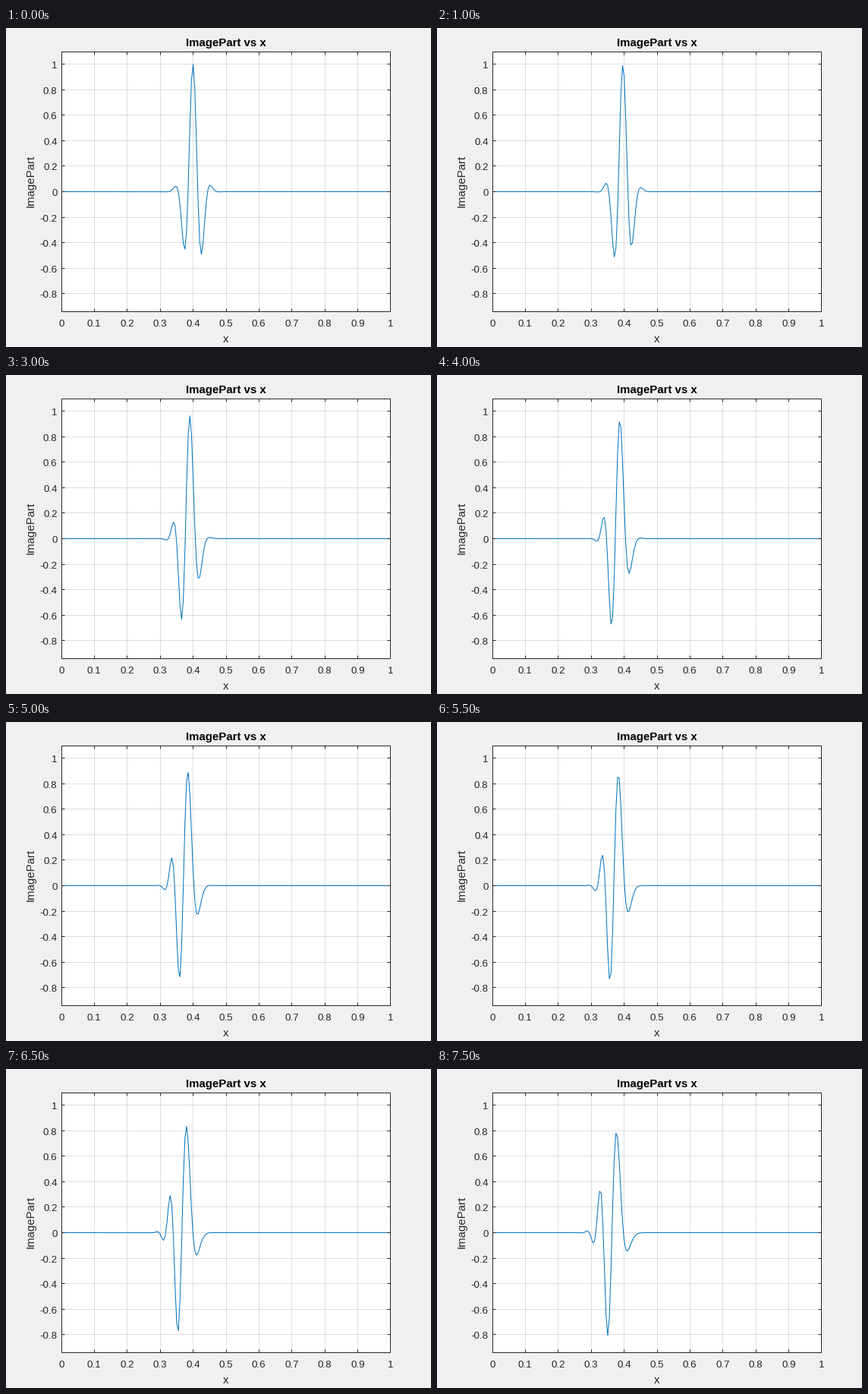
A matplotlib script that plays this animation: 560 by 420 pixels, repeating every 8 s.

```python
import numpy as np
import matplotlib.pyplot as plt
from matplotlib.animation import FuncAnimation

W, H, DPI = 560, 420, 100
LEFT, RIGHT, TOP, BOTTOM = 72.6, 506.4, 31, 373
ZERO, UNIT = 215, 168
INK, BLUE = "#262626", "#0072BD"
TICK_FONT, LABEL_FONT = 13.33, 15
TICK = 4
FRAMES, INTERVAL = 16, 500


def pt(px):
    return px * 72 / DPI


def px_x(x):
    return LEFT + x * (RIGHT - LEFT)


def px_y(y):
    return ZERO - y * UNIT


# Gaussian packet on a lattice, drifting left and spreading
DX, X0, K, A, PHASE, DT = 0.005, 0.4, 106.0, 1000.0, 0.079, 2.43e-5
ENERGY = (1 - np.cos(K * DX)) / DX**2
SPEED = np.sin(K * DX) / DX
SPREAD = 2 * A * np.cos(K * DX)
x = np.linspace(0, 1, 201)


def packet(t):
    w = X0 - x
    z = w - SPEED * t
    s = 1 + 1j * SPREAD * t
    carrier = np.exp(1j * (K * w - ENERGY * t - PHASE))
    return (carrier * np.exp(-A * z**2 / s) / np.sqrt(s)).real


fig = plt.figure(figsize=(W / DPI, H / DPI), dpi=DPI, facecolor="#f0f0f0")
ax = fig.add_axes([0, 0, 1, 1])
ax.set_xlim(0, W)
ax.set_ylim(H, 0)
ax.axis("off")


def stroke(xs, ys, color=INK, z=5, cap="butt", **kw):
    return ax.plot(xs, ys, color=color, lw=pt(1), zorder=z,
                   solid_capstyle=cap, **kw)[0]


def label(px, py, s, size, ha="center", color=INK, **kw):
    ax.text(px, py, s, fontsize=pt(size), ha=ha, va="baseline",
            color=color, family="Liberation Sans", **kw)


ax.add_patch(plt.Rectangle((LEFT, TOP), RIGHT - LEFT, BOTTOM - TOP,
                           fc="white", ec="none", zorder=0))

for v in np.arange(11) / 10:
    p = px_x(v)
    if 0 < v < 1:
        stroke([p, p], [TOP, BOTTOM], z=1, alpha=0.15)
    stroke([p, p], [BOTTOM, BOTTOM - TICK])
    stroke([p, p], [TOP, TOP + TICK])
    label(p + 0.3, 393, f"{v:g}", TICK_FONT)

for v in np.arange(-4, 6) / 5:
    p = px_y(v)
    stroke([LEFT, RIGHT], [p, p], z=1, alpha=0.15)
    stroke([LEFT, LEFT + TICK], [p, p])
    stroke([RIGHT, RIGHT - TICK], [p, p])
    label(67.5, p + 6, f"{v:g}", TICK_FONT, ha="right")

stroke([LEFT, RIGHT, RIGHT, LEFT, LEFT], [TOP, TOP, BOTTOM, BOTTOM, TOP],
       z=6, cap="projecting", solid_joinstyle="miter")

label(290, 24, "ImagePart vs x", LABEL_FONT, color="black", weight="bold")
label(290, 413.5, "x", LABEL_FONT)
label(37, 201.5, "ImagePart", LABEL_FONT, rotation=90, rotation_mode="anchor")

# Unsnapped, so it is moved to the pixel centres
curve = stroke(px_x(x) + 0.5, 0 * x, color=BLUE, z=4, snap=False)


def draw(i):
    curve.set_ydata(px_y(packet(i * DT)) + 0.5)
    return curve,


anim = FuncAnimation(fig, draw, frames=FRAMES, interval=INTERVAL,
                     init_func=lambda: draw(0), repeat=True, repeat_delay=0)
plt.show()
```
